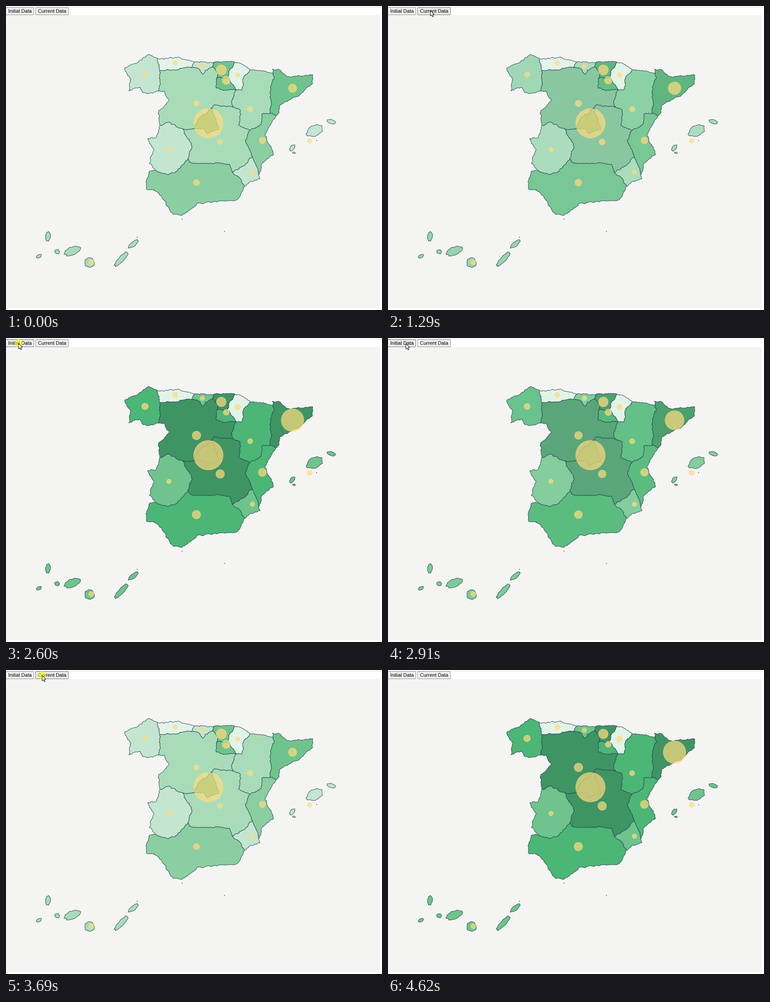
A matplotlib script for the animation above (5480 ms loop, 833x673 px).

```python
import math
import random

import matplotlib.pyplot as plt
import numpy as np
from matplotlib.animation import FuncAnimation
from matplotlib.colors import to_rgb
from matplotlib.patches import Circle, FancyBboxPatch, Polygon, Rectangle

W, H, LOOP, STEP = 833, 673, 5480, 20
PX = 0.72  # points per pixel at 100 dpi
OUTLINE, YELLOW = "#264653", (1, 0.863, 0.5)
# greens from light to dark
G0, G1, G2, G3, G4, G5, G6 = (
    "#e2f3e8", "#c4e6d0", "#a8dcb9", "#8bcea1", "#6ec48c", "#4bb675", "#3f9464")

rng = random.Random(11)

fig = plt.figure(figsize=(W / 100, H / 100), dpi=100, facecolor="white")
ax = fig.add_axes([0, 0, 1, 1])
ax.set_xlim(0, W)
ax.set_ylim(H, 0)
ax.axis("off")

# Junctions where borders meet
node = dict(
    A=(336, 117), B=(418, 124), C=(462, 124), D=(508, 125), E=(541, 141), F=(592, 148),
    G=(679, 152), H=(598, 243), I=(560, 374), J=(528, 399), K=(331, 364), L=(341, 264),
    M=(340, 188), N=(341, 143), O=(411, 136), P=(458, 135), Q=(467, 160), R=(490, 159),
    S=(510, 186), T=(505, 224), U=(455, 226), V=(418, 271), W=(391, 272), X=(403, 339),
    Y=(501, 368), Z=(546, 334), a=(541, 275), b=(584, 238), c=(471, 274))
edges = {}
morphs = []  # (patch, start colour, end colour)
bubbles = []  # (patch, start radius, end radius)


def roughen(p, q):
    """Midpoint displacement from p up to, not including, q."""
    dx, dy = q[0] - p[0], q[1] - p[1]
    size = math.hypot(dx, dy)
    if size < 3:
        return [p]
    k = rng.uniform(-1, 1) * min(0.2, 1.8 / size)
    mid = ((p[0] + q[0]) / 2 - k * dy, (p[1] + q[1]) / 2 + k * dx)
    return roughen(p, mid) + roughen(mid, q)


def edge(ends, *via):
    """Rough line between two junctions through a few bends."""
    pts = [node[ends[0]], *zip(via[::2], via[1::2]), node[ends[1]]]
    line = [pt for p, q in zip(pts, pts[1:]) for pt in roughen(p, q)] + [pts[-1]]
    edges[ends], edges[ends[::-1]] = line, line[::-1]


def add_shape(points, start, end, lw=0.95):
    shape = Polygon(points, closed=True, fc=start, ec=OUTLINE, lw=lw * PX,
                    joinstyle="round", zorder=2)
    ax.add_patch(shape)
    morphs.append((shape, np.array(to_rgb(start)), np.array(to_rgb(end))))


def bubble(x, y, start=5, end=5):
    disc = Circle((x, y), start, fc=YELLOW + (0.7,), ec=YELLOW + (0.75,), lw=0.95 * PX, zorder=3)
    ax.add_patch(disc)
    bubbles.append((disc, start, end))


def region(ring, start, end, *spot):
    """Fill the ring of junctions and put its bubble on top."""
    points = []
    for ends in zip(ring, ring[1:] + ring[0]):
        key = "".join(ends)
        if key not in edges:
            edge(key)
        points += edges[key]
    add_shape(points, start, end)
    bubble(*spot)


def island(x, y, length=1.6, width=1.6, tilt=0, start=OUTLINE, end=OUTLINE):
    """Uneven tilted ellipse; without a size, a speck."""
    c, s = math.cos(math.radians(tilt)), math.sin(math.radians(tilt))
    points = []
    for angle in np.linspace(0, 2 * math.pi, 18, endpoint=False):
        r = rng.uniform(0.42, 0.54)
        u, v = r * length * math.cos(angle), r * width * math.sin(angle)
        points.append((x + u * c - v * s, y + u * s + v * c))
    add_shape(points, start, end, 0.95 if length > 3 else 0.3)


# Coasts
edge("AM", 317, 107, 295, 121, 263, 138, 277, 162, 272, 188, 297, 180, 303, 192, 325, 193)
edge("AB", 375, 114)
edge("DE", 521, 128)
edge("FG", 590, 140, 608, 142, 626, 156, 655, 155)
edge("GH", 679, 172, 650, 198, 607, 219, 605, 236)
edge("HI", 574, 284, 593, 328, 568, 348)
edge("IJ", 562, 383, 540, 389)
edge("JK", 512, 429, 422, 438, 388, 464, 370, 461, 350, 430, 328, 408, 313, 407, 310, 390, 317, 367)
edge("KL", 318, 349, 328, 318, 314, 293, 332, 292)
edge("LM", 338, 232, 352, 220, 361, 206, 350, 188)
# Inner borders
edge("NO", 365, 142)
edge("OP", 429, 141, 435, 151, 442, 142)
edge("PQ", 470, 148)
edge("QS", 466, 182, 487, 186)
edge("ST", 500, 212)
edge("DR", 496, 140)
edge("RS", 501, 173)
edge("ES", 526, 160, 523, 185)
edge("Fb", 594, 160, 585, 190, 588, 215)
edge("ba", 567, 239, 565, 262)
edge("Ta", 519, 231, 516, 264)
edge("TU", 483, 222, 460, 220)
edge("UV", 445, 238, 428, 247)
edge("Uc", 462, 244)
edge("cV", 445, 283, 440, 273)
edge("WL", 360, 257)
edge("WX", 412, 312)
edge("KX", 357, 373, 379, 366)
edge("XY", 412, 348, 493, 350)
edge("YZ", 530, 352)
edge("aZ", 530, 297, 540, 318)
edge("YJ", 515, 378)

region("AMN", G1, G5, 308, 151.5, 5, 7.3)
region("ABON", G0, G0, 375, 126, 5, 5.8)
region("BCPO", G1, G4, 435, 133.5)
region("NOPQSTUVWLM", G2, G6, 422, 215.7, 6, 9.5)
region("CDRQP", G4, G6, 477, 141.5, 11.3, 10.6)
region("QRS", G4, G5, 488, 164.5, 9, 6.5)
region("DESR", G0, G0, 513, 153, 5, 6.5)
region("EFbaTS", G2, G5, 541, 228.5, 6, 5.7)
region("FGHb", G4, G6, 634.8, 182, 9.2, 25)
region("TaZYXWVU", G2, G6, 474.5, 301, 5.5, 9.5)
region("UcV", G5, G6, 448.5, 259.5, 32.6, 32.6)
region("WXKL", G1, G4, 361, 317.5)
region("KXYJ", G3, G5, 421.7, 391, 6.8, 9.4)
region("YZIJ", G1, G4, 546, 368)
region("bHIZa", G3, G5, 568, 297.5, 7, 9)

# Eastern islands
island(684, 276, 40, 24, -22, G1, G4)
island(721, 256, 20, 9, 15, G1, G4)
island(634, 314, 16, 9, -50, G1, G4)
island(638, 325, 7, 3, 10, G1, G4)
bubble(672.7, 298.5, 5, 5.6)
# South-western islands
island(93, 510, 22, 12, 95, G2, G4)
island(73, 554, 13, 7, -25, G2, G4)
island(113, 544, 11, 10, 0, G2, G4)
island(147, 542, 38, 18, -22, G2, G4)
island(185, 568, 23, 22, 0, G2, G4)
island(256, 560, 44, 12, -46, G2, G4)
island(282, 527, 27, 10, -38, G2, G4)
bubble(189, 567, 5.6, 5.6)
for speck in ((688, 298), (291, 512), (484, 499), (390, 472), (328, 407)):
    island(*speck)

# Page and buttons
ax.add_patch(Rectangle((0, 20), 828, 648.5, fc="#f4f4f2", zorder=0))
ax.add_patch(Rectangle((0, 2), W, 1, fc="#dcdcdc", zorder=0))
buttons = []
for left, right, label in ((-0.5, 61.5, "Initial Data"), (65.5, 138.5, "Current Data")):
    box = FancyBboxPatch((left, 3.5), right - left, 16, zorder=4, lw=PX,
                         boxstyle="round,pad=0,rounding_size=1.5")
    ax.add_patch(box)
    buttons.append((box, left, right))
    ax.text(left + 5.1, 15, label, family="Liberation Sans", size=10.9 * PX,
            color="black", va="baseline", zorder=5)

glow = Circle((0, 0), 9, fc=(1, 1, 0, 0.55), lw=0, zorder=6)
ax.add_patch(glow)
ARROW = np.array([(0, 0), (0, 12), (2.8, 9.6), (4.8, 14), (6.7, 13.2), (4.8, 8.9), (8.4, 8.6)])
pointer = Polygon(ARROW, closed=True, fc="white", ec="black", lw=0.9 * PX, zorder=7)
ax.add_patch(pointer)

# Pointer stops: time, x, y
STOPS = np.array([(70, 686, 564), (600, 111, 55), (840, 94, 10), (1680, 94, 10),
                  (1990, 28, 12), (2780, 28, 12), (3070, 56, 13),
                  (3460, 80, 12), (4090, 80, 12), (4620, 850, 660)])
CLICKS, GLOW_TIME = (1060, 2600, 3610), 160
MORPH_STARTS, MORPH = (1070, 2700, 3675), 500


def ease(u):
    """Cubic in and out."""
    u = min(max(u, 0), 1)
    return 4 * u ** 3 if u < 0.5 else 1 - 4 * (1 - u) ** 3


def progress(t):
    """0 for the initial data, 1 for the current data."""
    there, back, again = (ease((t - s) / MORPH) for s in MORPH_STARTS)
    return there - back + again


def update(i):
    t = i * STEP
    p = progress(t)
    for shape, start, end in morphs:
        shape.set_facecolor(np.clip(start + (end - start) * p, 0, 1))
    for disc, start, end in bubbles:
        disc.set_radius(start + (end - start) * p)

    shown = 70 <= t < 4620
    x, y = (np.interp(t, STOPS[:, 0], STOPS[:, k]) for k in (1, 2))
    pointer.set_visible(shown)
    pointer.set_xy(ARROW + (x, y))
    glow.set_visible(any(0 <= t - click < GLOW_TIME for click in CLICKS))
    glow.set_center((x, y))
    for box, left, right in buttons:
        hover = shown and left <= x <= right and y < 20
        box.set_facecolor("#ebebeb" if hover else "#efefef")
        box.set_edgecolor("#777777" if hover else "#959595")
    return []


anim = FuncAnimation(fig, update, frames=LOOP // STEP, interval=STEP,
                     repeat=True, repeat_delay=0, blit=False)
plt.show()
```
